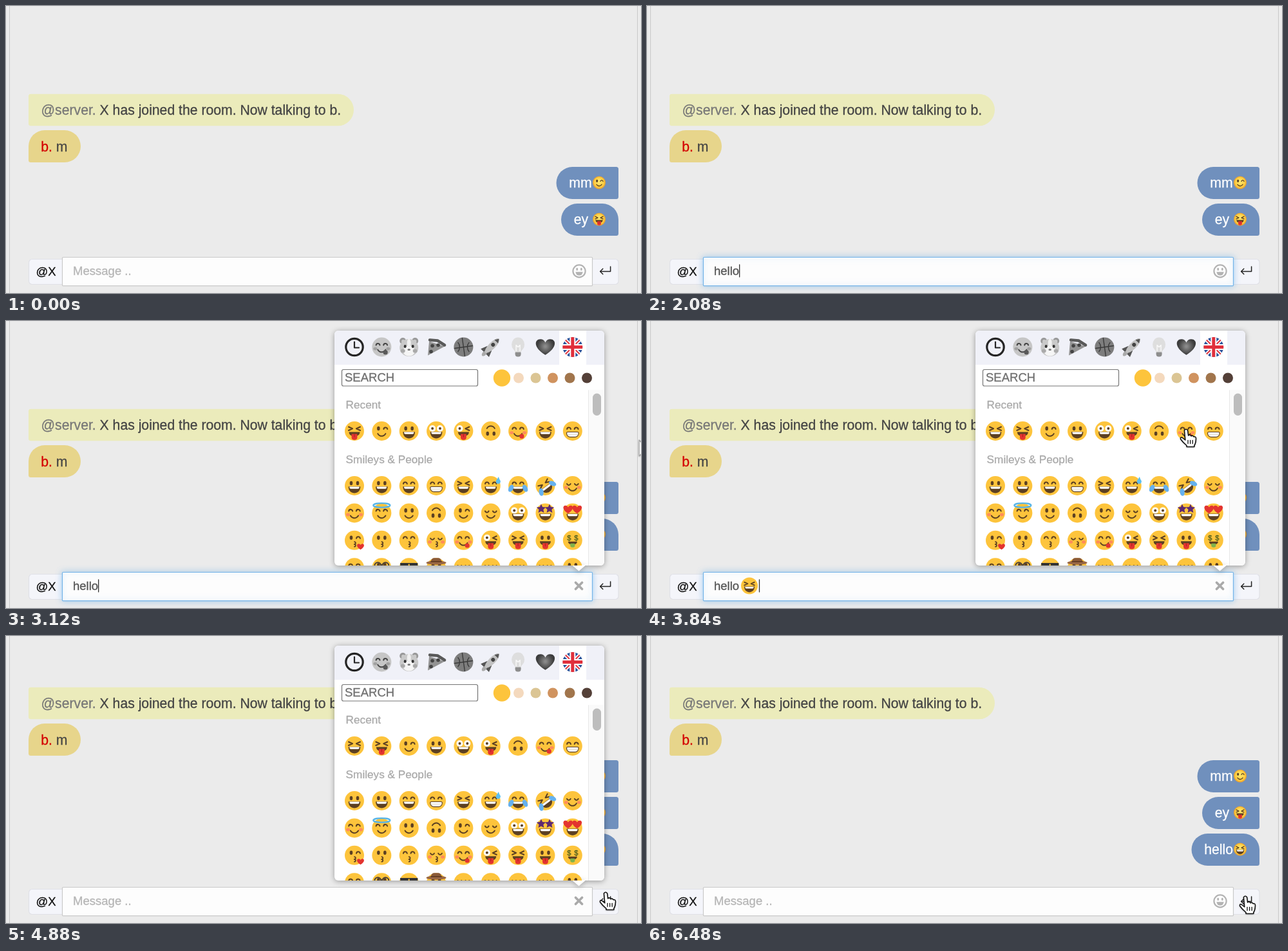
These frames come from a looping animation (986x446 px, 6560 ms). An HTML page with a canvas:

```html
<!DOCTYPE html>
<html lang="en">
<head>
<meta charset="utf-8">
<title>Chat with emoji picker</title>
<style>
html, body { margin: 0; width: 100%; height: 100%; overflow: hidden; background: #ebebeb; }
canvas { display: block; }
</style>
</head>
<body>
<canvas id="stage" width="986" height="446"></canvas>
<script>
const W = 986, H = 446, LOOP = 6560, STEP = 80, PI = Math.PI;
const FOCUS = 480, TYPE = 880, OPEN = 2120, PICK = 3840, SEND = 4880;
const PANEL_FADE = 250, ICON_FADE = 400;
const BROWN = '#5c4022', YELLOW = '#fdc43c', RED = '#e3342f';
const stage = document.getElementById('stage').getContext('2d');
let g = stage;

const clamp = v => Math.max(0, Math.min(1, v));
const smooth = v => { v = clamp(v); return v * v * (3 - 2 * v); };

// ---- drawing helpers ----
function at(x, y, scale, angle, draw) {
  g.save();
  g.translate(x, y);
  g.rotate(angle);
  g.scale(scale, scale);
  draw();
  g.restore();
}
function oval(x, y, rx, ry, fill) {
  g.beginPath();
  g.ellipse(x, y, rx, ry, 0, 0, 2 * PI);
  g.fillStyle = fill;
  g.fill();
}
function curve(x, y, r, from, to, width = 2, color = BROWN) {
  g.beginPath();
  g.arc(x, y, r, from, to);
  pen(color, width);
}
function pen(color, width) {
  g.strokeStyle = color;
  g.lineWidth = width;
  g.lineCap = g.lineJoin = 'round';
  g.stroke();
}
function line(points, color, width) {
  g.beginPath();
  for (let i = 0; i < points.length; i += 2) g.lineTo(points[i], points[i + 1]);
  pen(color, width);
}
function shape(points, fill) {
  g.beginPath();
  for (let i = 0; i < points.length; i += 2) g.lineTo(points[i], points[i + 1]);
  g.closePath();
  g.fillStyle = fill;
  g.fill();
}
function box(x, y, w, h, radii, fill, border) {
  g.beginPath();
  g.roundRect(x, y, w, h, radii);
  if (fill) { g.fillStyle = fill; g.fill(); }
  if (border) { g.strokeStyle = border; g.lineWidth = 1.2; g.stroke(); }
}
// A thin outline gives the slightly heavy look of smoothed text.
function text(str, x, y, size, color) {
  g.font = size + 'px "Liberation Sans", Arial, sans-serif';
  g.fillStyle = g.strokeStyle = color;
  g.lineWidth = .3;
  g.fillText(str, x, y);
  g.strokeText(str, x, y);
  return x + g.measureText(str).width;
}
function heart(x, y, s, fill) {
  at(x, y, s, 0, () => {
    g.beginPath();
    g.moveTo(0, .95);
    g.bezierCurveTo(-1.4, .1, -1.2, -.8, -.55, -.8);
    g.quadraticCurveTo(-.15, -.8, 0, -.42);
    g.quadraticCurveTo(.15, -.8, .55, -.8);
    g.bezierCurveTo(1.2, -.8, 1.4, .1, 0, .95);
    g.fillStyle = fill;
    g.fill();
  });
}
function star(x, y, r, fill) {
  const pts = [];
  for (let i = 0; i < 10; i++) {
    const a = i * PI / 5 - PI / 2, d = i % 2 ? r * .48 : r;
    pts.push(x + d * Math.cos(a), y + d * Math.sin(a));
  }
  shape(pts, fill);
}

// ---- emoji: eye letter, mouth letter, then extras ----
const bead = s => {
  oval(s * 5.9, -4, 5, 5, '#fff');
  oval(s * 5.9, -4, 2, 2, BROWN);
};
const eyes = {
  o: s => oval(s * 5, -4, 2.3, 3.3, BROWN),
  n: s => curve(s * 5.8, -2.5, 3, PI * 1.05, PI * 1.95),
  u: s => curve(s * 6, -4, 3, .1 * PI, .9 * PI),
  x: s => line([s * 9, -6.5, s * 3, -3.7, s * 9, -1], BROWN, 2.1),
  w: s => s < 0 ? eyes.o(s) : curve(6, -2.5, 3, PI * 1.05, PI * 1.95),
  z: bead,
  p: s => s < 0 ? bead(s) : eyes.x(s),
  '*': s => star(s * 6.5, -6.5, 7.5, '#5d2a72'),
  h: s => heart(s * 7, -6, 7, RED),
  $: s => { g.textAlign = 'center'; text('$', s * 5.5, 0, 11, '#465a1e'); g.textAlign = 'left'; }
};
function bowl(w, y, h) {
  g.beginPath();
  g.moveTo(-w, y);
  g.lineTo(w, y);
  g.bezierCurveTo(w, y + h * 1.3, -w, y + h * 1.3, -w, y);
  g.fillStyle = BROWN;
  g.fill();
}
const mouths = {
  s: () => curve(0, 1, 6.8, .15 * PI, .85 * PI),
  O: () => { bowl(9.3, 1.2, 10.5); box(-7.6, 1.6, 15.2, 3.2, [0, 0, 2, 2], '#fff'); },
  G: () => { box(-9.3, 1.5, 18.6, 7.8, [2, 2, 6, 6], '#fff', BROWN); line([-8.5, 5.2, 8.5, 5.2], '#c9bda8', .7); },
  T: () => { bowl(8.5, 1.4, 7); box(-4.4, 4.5, 8.8, 9.3, [1, 1, 4, 4], RED); line([0, 5, 0, 9], '#a8201f', 1); },
  k: () => { curve(0, 4.2, 1.9, -PI / 2, PI / 2, 1.8); curve(0, 8, 1.9, -PI / 2, PI / 2, 1.8); },
  y: () => { mouths.s(); oval(5.8, 8.2, 3.6, 3.6, RED); },
  f: () => curve(0, 11, 5.5, 1.2 * PI, 1.8 * PI),
  l: () => { bowl(7, 2, 5); box(-3.6, 5, 7.2, 6, [1, 1, 3, 3], '#7fb34b'); }
};
const extras = {
  b: () => [-1, 1].forEach(s => oval(s * 10, 2.6, 3, 2.4, '#ff8c5a')),
  d: () => { shape([12, -14, 8, -7, 15, -6], '#5dbff0'); oval(11.5, -6.5, 3.5, 3.5, '#5dbff0'); },
  t: () => [-1, 1].forEach(s => at(s * 11, 4, 1, s * -.5, () => oval(0, 0, 3.6, 6, '#65b1ef'))),
  a: () => { g.beginPath(); g.ellipse(0, -12, 13, 3.2, 0, 0, 2 * PI); pen('#56b4e8', 2.2); },
  q: () => heart(9.5, 9.5, 5.2, RED),
  g: () => { [-1, 1].forEach(s => curve(s * 6, -3, 5, 0, 2 * PI, 2, '#4a3f36')); line([-1, -4, 1, -4], '#4a3f36', 2); },
  S: () => { box(-13.5, -7, 12.5, 8, [1, 1, 5, 5], '#333'); box(1, -7, 12.5, 8, [1, 1, 5, 5], '#333'); line([-13, -6.5, 13, -6.5], '#333', 1.5); },
  H: () => { box(-8, -15, 16, 8, [5, 5, 0, 0], '#8a5a38'); oval(0, -7.5, 15.5, 3, '#9a6844'); line([-8, -9.3, 8, -9.3], '#5f3a22', 1.8); }
};
function face(x, y, r, spec, glossy) {
  const [eye, mouth, ...more] = spec;
  const turn = more.includes('F') ? PI : more.includes('R') ? -.65 : 0;
  at(x, y, r / 15, turn, () => {
    let skin = YELLOW;
    if (glossy) {
      skin = g.createRadialGradient(0, -3, 3, 0, 0, 15);
      skin.addColorStop(0, '#ffe467');
      skin.addColorStop(.7, '#fccb40');
      skin.addColorStop(1, '#e99a2c');
    }
    oval(0, 0, 15, 15, skin);
    if (more.includes('b')) extras.b();
    [-1, 1].forEach(eyes[eye]);
    mouths[mouth]();
    more.forEach(m => m !== 'b' && extras[m] && extras[m]());
  });
}

// ---- picker ----
const RECENT = 'xT ws oO zO pT osF nyb xO nG'.split(' ');
const RECENT_NEW = ['xO', ...RECENT.filter(e => e !== 'xO')];
const ROWS = [
  'oO oO nO nG xO nOd nOt xOtR usb',
  'nsb nsa os osF ws us zO *O hO',
  'wkq ok nk ukb nyb pT xT oT $l',
  'nOb osg osS osH us uf uf uf of'
].map(row => row.split(' '));
const colX = i => 541 + 42.35 * i;

const tabs = [
  () => { curve(0, 0, 13.2, 0, 2 * PI, 3.2, '#252525'); line([0, -8, 0, 1, 7, 1], '#252525', 2.2); },
  () => { g.filter = 'grayscale(1)'; face(0, 0, 15, 'nyb'); g.filter = 'none'; },
  () => {
    [-1, 1].forEach(s => { oval(s * 9.5, -9.5, 5, 5, '#999'); oval(s * 9, -9, 2.6, 2.6, '#ccc'); });
    oval(0, 1, 14.5, 13.5, '#c9c9c9');
    oval(0, 6, 9, 8, '#f5f5f5');
    oval(0, -6, 3, 7, '#f1f1f1');
    [-1, 1].forEach(s => { oval(s * 6, -1, 2, 2.4, '#333'); oval(s * 9.5, 6, 3.5, 3, '#aaa'); });
    oval(0, 4, 2.2, 1.6, '#777');
  },
  () => {
    shape([-11, -9, 13, -1, -13, 13], '#939393');
    line([-10, -11, 2, -10, 13, -3], '#5a5a5a', 4.5);
    [[-6, -2], [3, -3], [-8, 7]].forEach(p => oval(p[0], p[1], 2.8, 2.8, '#444'));
  },
  () => {
    oval(0, 0, 15, 15, '#7d7d7d');
    line([-14, 2, 14, -2], '#3a3a3a', 1.4);
    line([-2, -14, 2, 14], '#3a3a3a', 1.4);
    curve(-17, 0, 11, -.7, .7, 1.4, '#3a3a3a');
    curve(17, 0, 11, PI - .7, PI + .7, 1.4, '#3a3a3a');
  },
  () => at(0, 0, 1, PI / 4, () => {
    shape([-5, 3, -9, 13, 9, 13, 5, 3], '#555');
    oval(0, 14, 3, 5, '#aaa');
    oval(0, -3, 5.2, 15, '#c2c2c2');
    shape([-4, -12, 0, -18, 4, -12], '#555');
    oval(0, -5, 3, 3, '#444');
  }),
  () => {
    oval(0, -4, 10, 11, '#dedede');
    shape([-7, 2, 7, 2, 4, 9, -4, 9], '#dedede');
    line([-3, 6, -3, -3, 0, 0, 3, -3, 3, 6], '#f8f8f8', 1.6);
    box(-4.5, 8, 9, 7, [1, 1, 4, 4], '#8d8d8d');
  },
  () => {
    const shade = g.createRadialGradient(0, 0, .1, 0, 0, 1);
    shade.addColorStop(0, '#8a8a8a');
    shade.addColorStop(.9, '#3c3c3c');
    heart(0, -1, 14, shade);
  },
  () => {
    g.beginPath();
    g.arc(0, 0, 15.5, 0, 2 * PI);
    g.clip();
    g.fillStyle = '#28529a';
    g.fill();
    const cross = (color, w) => { line([-16, 0, 16, 0], color, w); line([0, -16, 0, 16], color, w); };
    at(0, 0, 1, PI / 4, () => { cross('#fff', 5.5); cross('#e33b45', 2.2); });
    cross('#fff', 9);
    cross('#e0303c', 5);
  }
];

function makePicker(recent) {
  const layer = document.createElement('canvas');
  layer.width = W;
  layer.height = H;
  g = layer.getContext('2d');
  g.save();
  g.shadowColor = 'rgba(0,0,0,.36)';
  g.shadowBlur = 8;
  g.shadowOffsetY = 1.3;
  box(510, 15, 419, 365, 6, '#fff');
  shape([879.5, 380, 889.5, 388.5, 899.5, 380], '#fff');
  g.restore();
  shape([879, 379, 889.5, 387.5, 900, 379], '#fff');

  g.save();
  box(510, 15, 419, 365, 6);
  g.clip();
  box(510, 15, 419, 53, 0, '#f0f1f8');
  box(859, 15, 42, 53, 0, '#fff');
  tabs.forEach((draw, i) => at(colX(i), 40.5, 1, 0, draw));

  box(521.5, 75.5, 211, 25.5, 2.5, '#fff', '#757575');
  text('SEARCH', 526, 94.2, 18.55, '#6f6f6f');
  oval(770, 88.5, 13.2, 13.2, YELLOW);
  ['#f4d9bd', '#dbc594', '#d0935f', '#a1754c', '#544038'].forEach((c, i) => oval(796 + 26.5 * i, 88.5, 8, 8, c));

  box(904, 107, 25, 274, 0, '#fafafa');
  line([904.5, 107.5, 904.5, 381], '#e7e7e7', 1);
  box(911, 112.5, 13, 34.5, 6.5, '#bdbdbd');
  text('Recent', 527.6, 136, 17.2, '#a9a9a9');
  text('Smileys & People', 527.6, 220.7, 17.2, '#a9a9a9');
  recent.forEach((e, i) => face(colX(i), 171, 15, e));
  ROWS.forEach((row, j) => row.forEach((e, i) => face(colX(i), 256 + 42.4 * j, 15, e)));
  g.restore();
  g = stage;
  return layer;
}
const pickers = [makePicker(RECENT), makePicker(RECENT_NEW)];

// ---- chat ----
const BIG = 25, SMALL = 3.5, BLUE = '#7090bd';
function mine(left, y, str, emoji, last) {
  box(left, y, 951 - left, 50, [BIG, last ? BIG : SMALL, SMALL, BIG], BLUE);
  text(str, left + 19.8, y + 32, 21.2, '#fff');
  face(921, y + 24.5, 10, emoji, true);
}
function chat(sent) {
  const y = sent ? 79.7 : 136.7;
  box(35, y, 505, 49.6, [SMALL, BIG, BIG, SMALL], '#ebebbb');
  const x = text('@server. ', 54.6, y + 32, 21.2, '#777');
  text('X has joined the room. Now talking to b.', x, y + 32, 21.2, '#444');
  box(35, y + 56.3, 81, 50, [BIG, BIG, BIG, SMALL], '#e7d58b');
  text('m', text('b. ', 54.2, y + 89, 21.2, '#d40000'), y + 89, 21.2, '#444');
  mine(854.5, y + 113.3, 'mm', 'ws', false);
  mine(862, y + 170.3, 'ey ', 'xT', !sent);
  if (sent) mine(845.5, y + 227.3, 'hello', 'xO', true);
}

// ---- input row ----
function toggle(open) {
  const c = '#b3b3b3';
  g.globalAlpha = 1 - open;
  at(890, 412, 1, PI / 4 * open, () => {
    curve(0, 0, 9.6, 0, 2 * PI, 2.2, c);
    [-1, 1].forEach(s => oval(s * 3.3, -3, 1.4, 2.3, c));
    g.beginPath();
    g.arc(0, 1.2, 5.6, 0, PI);
    g.fillStyle = c;
    g.fill();
  });
  g.globalAlpha = open;
  at(889.5, 411.5, 1, -PI / 4 * (1 - open), () => {
    g.beginPath();
    g.moveTo(-5, -5); g.lineTo(5, 5);
    g.moveTo(5, -5); g.lineTo(-5, 5);
    pen('#aaa', 3.8);
  });
  g.globalAlpha = 1;
}
function inputRow(t, open) {
  const focused = t >= FOCUS && t < SEND;
  box(35.5, 393.5, 56, 39, 5, '#f4f5fa', '#e0e1e7');
  box(906, 393.5, 45, 39, 5, '#f4f5fa', '#e0e1e7');
  text('@X', 46.4, 418.5, 18.55, '#111');
  line([938.6, 405, 938.6, 412.5, 923, 412.5], '#222', 1.5);
  line([926.8, 408.3, 922.6, 412.5, 926.8, 416.7], '#222', 1.5);

  g.save();
  if (focused) {
    g.shadowColor = 'rgba(102,175,233,.55)';
    g.shadowBlur = 10;
  }
  box(87.5, 390.5, 823, 44.3, 1, '#fdfdfd', focused ? '#74b4e8' : '#c9c9c9');
  g.restore();

  const typed = t < SEND ? 'hello'.slice(0, Math.max(0, Math.floor((t - TYPE) / 130) + 1)) : '';
  let x = 104;
  if (typed) x = text(typed, x, 418, 18.55, '#555');
  else text('Message ..', x, 418, 18.55, '#b5b5b5');
  if (t >= PICK && t < SEND) {
    face(159, 411.5, 13, 'xO');
    x = 174;
  }
  const blink = t < 1700 || (t + 300) % 1000 < 500;
  if (focused && blink) line([x + .5, 402, x + .5, 421], '#333', 1.3);
  toggle(open);
}

// ---- mouse pointer: time, x, y ----
const PATH = [
  [3040, 1000, 190], [3120, 983, 185], [3440, 837, 168], [4000, 837, 168],
  [4480, 931, 398], [5360, 931, 398], [5520, 929, 404]
];
function pointer(t) {
  if (t < PATH[0][0]) return;
  let [, x, y] = PATH[PATH.length - 1];
  for (let i = 1; i < PATH.length; i++) {
    const a = PATH[i - 1], b = PATH[i];
    if (t < b[0]) {
      const k = smooth((t - a[0]) / (b[0] - a[0]));
      x = a[1] + (b[1] - a[1]) * k;
      y = a[2] + (b[2] - a[2]) * k;
      break;
    }
  }
  const hand = (t > 3400 && t < 4060) || t > 4400;
  g.save();
  g.translate(x, y);
  g.shadowColor = 'rgba(0,0,0,.35)';
  g.shadowBlur = 3;
  g.shadowOffsetY = 1;
  const outline = new Path2D(hand
    ? 'M-2.6 2Q0-1.6 2.6 2L3.6 10Q6 7.5 8 10.8Q10.5 9 12 12Q15.5 11 15.5 15L15 20Q14 24 12.8 25.5L12.8 27.5H1V25.5Q-5 20.5-8.5 15.5Q-9 11.5-5.5 13.5L-1.2 17Z'
    : 'M0 0V25L5.8 19.5L9.6 28L13.4 26.3L9.8 18H18Z');
  g.fillStyle = '#fff';
  g.fill(outline);
  g.shadowColor = 'transparent';
  g.strokeStyle = hand ? '#111' : '#aaa';
  g.lineWidth = 1.6;
  g.lineJoin = 'round';
  g.stroke(outline);
  if (hand) [3, 6.6, 10.2].forEach(f => line([f, 17.5, f, 22.5], '#111', 1.3));
  g.restore();
}

function draw(t) {
  const opened = fade => t < SEND ? smooth((t - OPEN) / fade) : 1 - smooth((t - SEND) / fade);
  const open = opened(PANEL_FADE);
  g.fillStyle = '#ebebeb';
  g.fillRect(0, 0, W, H);
  g.fillStyle = '#c9c9c9';
  g.fillRect(5, 0, 1, H);
  g.fillRect(980, 0, 1, H);
  chat(t >= SEND);
  inputRow(t, opened(ICON_FADE));
  if (open > 0) {
    g.globalAlpha = open;
    g.drawImage(pickers[t >= PICK ? 1 : 0], 0, -13.25 * (1 - open));
    g.globalAlpha = 1;
  }
  pointer(t);
}
function tick() {
  const t = performance.now() % LOOP;
  draw(Math.floor(t / STEP) * STEP);
  requestAnimationFrame(tick);
}
tick();
</script>
</body>
</html>
```
